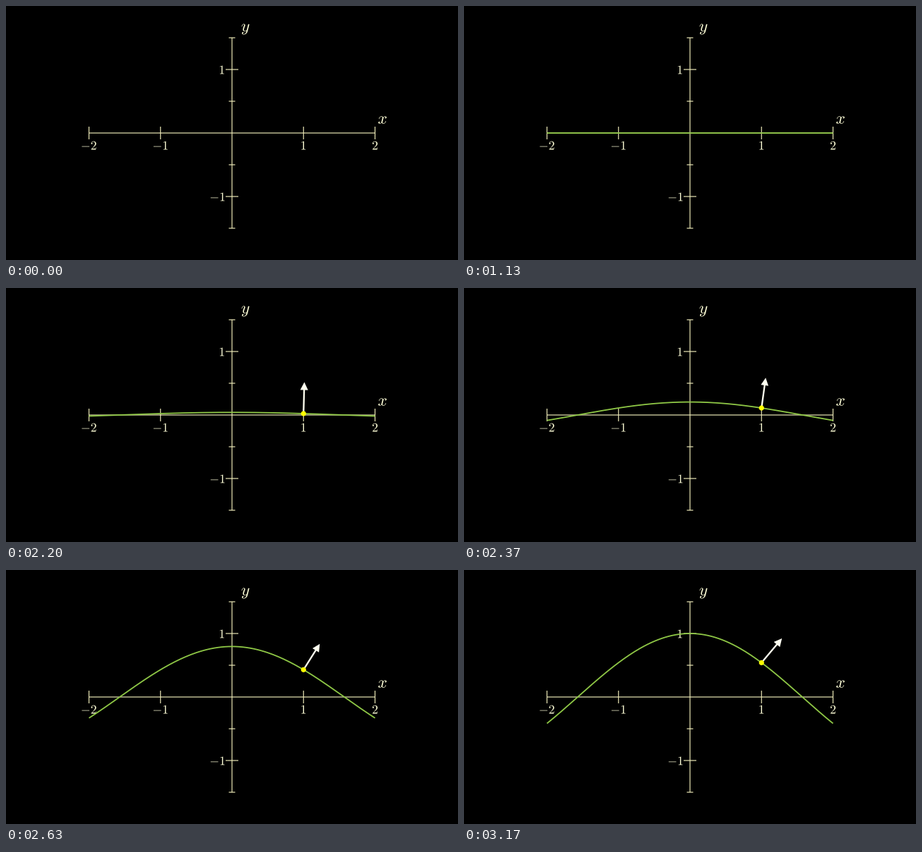
A matplotlib script for the animation above (8.01 s loop, 640x360 px).

```python
import math

import numpy as np
import matplotlib.pyplot as plt
from matplotlib.animation import FuncAnimation
from matplotlib.patches import Circle, PathPatch, Polygon
from matplotlib.textpath import TextPath
from matplotlib.transforms import Affine2D

W, H, DPI = 640, 360, 100
CX, CY = 320, 180
UX, UY = 101.25, 90
STEP_MS, LOOP_MS = 15, 8010
FPS = 30
MOVE_START = 60

AXIS = "#ebe8b6"
TEXT = "#ffffd8"
GREEN = "#8fc846"
YELLOW = "#ffff00"
WHITE = "#fffff0"

plt.rcParams["mathtext.fontset"] = "cm"
fig = plt.figure(figsize=(W / DPI, H / DPI), dpi=DPI, facecolor="black")
ax = fig.add_axes([0, 0, 1, 1])
ax.set_xlim(0, W)
ax.set_ylim(H, 0)
ax.axis("off")


def line(xs, ys, color, width, z):
    return ax.plot(xs, ys, color=color, lw=width * 72 / DPI, zorder=z,
                   solid_capstyle="butt", solid_joinstyle="round",
                   snap=False)[0]


def label(tex, x, y, size):
    """Set a formula with the middle of its ink at (x, y)."""
    path = TextPath((0, 0), f"${tex}$", size=size)
    box = path.get_extents()
    place = (Affine2D()
             .translate(-(box.x0 + box.x1) / 2, -(box.y0 + box.y1) / 2)
             .scale(1, -1).translate(x, y))
    ax.add_patch(PathPatch(place.transform_path(path), fc=TEXT, lw=0,
                           zorder=2))


def smooth(t):
    t = min(max(t, 0), 1)
    edge = 1 / (1 + math.exp(5))
    return (1 / (1 + math.exp(-10 * (t - 0.5))) - edge) / (1 - 2 * edge)


def draw_axes():
    line([CX - 2 * UX, CX + 2 * UX], [CY, CY], AXIS, 1.2, 1)
    line([CX, CX], [CY - 1.5 * UY, CY + 1.5 * UY], AXIS, 1.2, 1)
    for n in (-2, -1, 1, 2):
        x = CX + n * UX
        line([x, x], [CY - 9, CY + 9], AXIS, 1.2, 1)
        label(str(n), x, 197.6, 17.8)
    for n in (-1.5, -1, -0.5, 0.5, 1, 1.5):
        y = CY - n * UY
        half = 9 if abs(n) == 1 else 4.5
        line([CX - half, CX + half], [y, y], AXIS, 1.2, 1)
    label("1", 305.8, 90.4, 17.8)
    label("-1", 299.6, 270.4, 17.8)
    label("x", 533, 161.6, 23.5)
    label("y", 339, 33, 23.5)


draw_axes()
curve = line([], [], GREEN, 1.8, 3)
shaft = line([], [], WHITE, 2.3, 4)
tip = ax.add_patch(Polygon(np.zeros((3, 2)), fc=WHITE, lw=0, zorder=5))
dot = ax.add_patch(Circle((0, 0), 3.6, fc=YELLOW, lw=0, zorder=6))
pointer = (shaft, tip, dot)

# Arrow outline around the dot: start, neck, tip, two base corners
UP = np.array([[0, 0], [0, -34.5], [0, -45], [-5.6, -33.75], [5.6, -33.75]])
turn = math.atan(math.sin(1))
c, s = math.cos(turn), math.sin(turn)
TILTED = UP @ np.array([[c, s], [-s, c]])


def update(i):
    k = int((i * STEP_MS + 10) * FPS / 1000)
    drawn = smooth((k + 0.5) / FPS) if k else 0
    bend = smooth((k - MOVE_START) / FPS)

    x = np.linspace(-2, -2 + 4 * drawn, 161)
    curve.set_data(CX + x * UX, CY - bend * UY * np.cos(x))
    curve.set_visible(drawn > 0)

    base = np.array([CX + UX, CY - bend * UY * math.cos(1)])
    arrow = base + (1 - bend) * UP + bend * TILTED
    shaft.set_data(arrow[:2, 0], arrow[:2, 1])
    tip.set_xy(arrow[2:])
    dot.center = tuple(base)
    for part in pointer:
        part.set_visible(k >= MOVE_START)
    return (curve, *pointer)


anim = FuncAnimation(fig, update, frames=LOOP_MS // STEP_MS,
                     init_func=lambda: update(0), interval=STEP_MS,
                     repeat=True, repeat_delay=0, blit=False)
plt.show()
```
